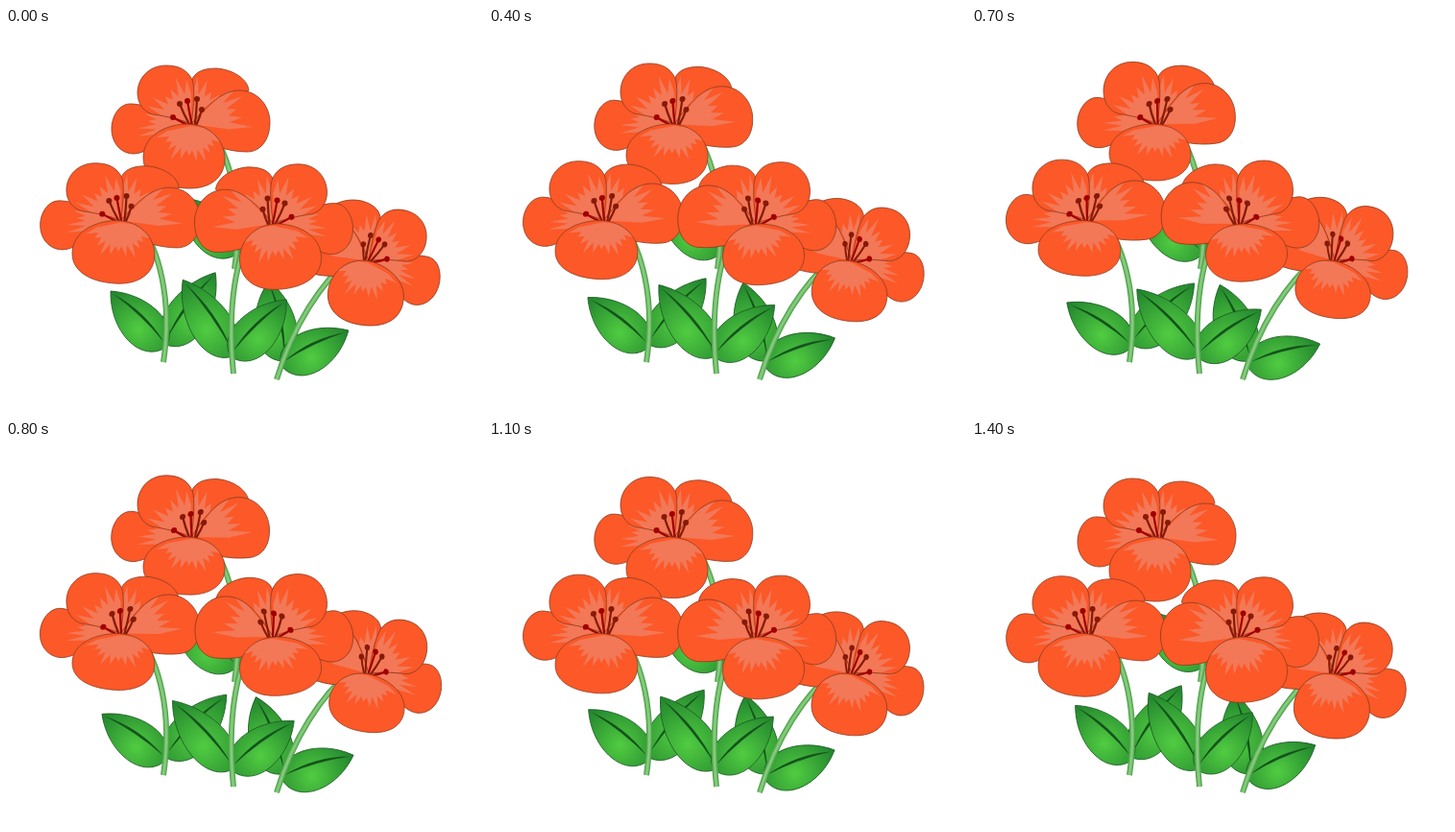
Recreate the animation shown at these times as an HTML page with a canvas. Size 497x401 px, loop 1500 ms.

```html
<!DOCTYPE html>
<html lang="en">
<head>
<meta charset="utf-8">
<title>Swaying flowers</title>
<style>
html, body { margin: 0; width: 100%; height: 100%; overflow: hidden; background: #fff; }
canvas { display: block; }
</style>
</head>
<body>
<canvas width="497" height="401"></canvas>
<script>
const ctx = document.querySelector('canvas').getContext('2d');
const RAD = Math.PI / 180;

// Jagged pale fan spreading from the flower centre, angles in degrees.
function fan(from, to, spikes, radius, y = 0) {
  const path = new Path2D();
  path.moveTo(0, y);
  for (let i = 0; i <= spikes * 2; i++) {
    const angle = (from + (to - from) * i / (spikes * 2)) * RAD;
    const r = radius * (i % 2 ? 0.88 + 0.12 * Math.sin(i * 2.3) : 0.62);
    path.lineTo(Math.cos(angle) * r, y + Math.sin(angle) * r);
  }
  path.closePath();
  return path;
}

// turn: degrees at full sway, stretch: change of height at full sway
const petal = (d, streaks, turn, stretch) => ({ shape: new Path2D(d), streaks, turn, stretch });
const backPetals = [
  petal('M0 0C-10 -4 -40 -20 -62 -21C-75 -22 -83 -8 -83 5C-83 20 -73 31 -60 31C-45 31 -25 12 0 0Z',
    fan(163, 196, 4, 59), 6, 0),
  petal('M0 0C-1 -20 -1 -38 1 -47C5 -55 14 -58 26 -58C43 -57 59 -47 60 -35C52 -30 20 -16 0 0Z',
    fan(272, 320, 4, 51), 0, 0.05),
  petal('M0 0C3 -20 4 -38 1 -46C-4 -57 -14 -61 -26 -61C-44 -61 -56 -48 -56 -32C-56 -20 -48 -12 -40 -10C-25 -8 -8 -4 0 0Z',
    fan(196, 270, 6, 51), 0, 0.06),
  petal('M0 0C12 -14 30 -35 50 -35C70 -35 82 -18 82 -2C82 17 72 29 58 29C48 29 38 27 28 24C20 20 10 8 0 0Z',
    fan(-44, 8, 5, 64), -8.5, 0)
];
const frontPetal = petal('M-5 0C-30 1 -50 14 -50 35C-50 56 -28 66 -4 67C18 68 35 57 35 36C35 18 20 0 -5 0Z',
  fan(8, 168, 12, 41, 2), 0, -0.12);
const anthers = [[-12, -21], [-4, -24], [6, -26], [11, -15], [-19, -7]];

function drawPetal({ shape, streaks, turn, stretch }, sway) {
  ctx.save();
  ctx.rotate(turn * sway * RAD);
  ctx.scale(1, 1 + stretch * sway);
  ctx.fillStyle = '#fc5828';
  ctx.fill(shape);
  ctx.save();
  ctx.clip(shape);
  ctx.fillStyle = '#f27857';
  ctx.fill(streaks);
  ctx.restore();
  ctx.strokeStyle = '#8c3c20';
  ctx.lineWidth = 0.8;
  ctx.stroke(shape);
  ctx.restore();
}

function drawStamens(sway) {
  ctx.save();
  ctx.transform(1, 0, -0.17 * sway, 1, 0, 0);
  ctx.lineWidth = 2.2;
  anthers.forEach(([x, y], i) => {
    ctx.strokeStyle = ctx.fillStyle = i === 4 || i === 1 ? '#a00000' : '#861a08';
    ctx.beginPath();
    ctx.moveTo(x * 0.3 + 2, 1);
    ctx.quadraticCurveTo(x * 0.75 + 1, y * 0.5, x, y);
    ctx.stroke();
    ctx.beginPath();
    ctx.arc(x, y, 3, 0, 7);
    ctx.fill();
  });
  ctx.restore();
}

function drawFlower([x, y, scaleX, scaleY, tilt = 0], sway) {
  ctx.save();
  ctx.translate(x, y);
  ctx.rotate(tilt * RAD);
  ctx.scale(scaleX, scaleY);
  backPetals.forEach(p => drawPetal(p, sway));
  drawStamens(sway);
  drawPetal(frontPetal, sway);
  ctx.restore();
}

// Drawn along the x axis with the upper side at negative y.
function drawLeaf([x, y, angle, length, turn], sway) {
  const at = f => length * f;
  ctx.save();
  ctx.translate(x, y);
  ctx.rotate((angle + turn * sway) * RAD);
  if (angle < -90) ctx.scale(1, -1);
  const green = ctx.createRadialGradient(at(0.4), 7, 1, at(0.4), 7, at(0.62));
  green.addColorStop(0, '#50cb41');
  green.addColorStop(1, '#1f7f2c');
  ctx.beginPath();
  ctx.moveTo(0, 0);
  ctx.bezierCurveTo(at(0.06), -27, at(0.62), -28, at(1), 0);
  ctx.bezierCurveTo(at(0.64), 30, at(0.08), 30, 0, 0);
  ctx.fillStyle = green;
  ctx.fill();
  ctx.strokeStyle = '#1d5c24';
  ctx.lineWidth = 0.8;
  ctx.stroke();
  ctx.beginPath();
  ctx.moveTo(at(0.06), -3);
  ctx.quadraticCurveTo(at(0.5), -11.5, at(0.95), 0);
  ctx.quadraticCurveTo(at(0.5), -6, at(0.06), -3);
  ctx.fillStyle = '#14541c';
  ctx.fill();
  ctx.restore();
}

function drawStem(d) {
  const path = new Path2D(d);
  [['#4ea34a', 6], ['#6dbb66', 4], ['#8acb82', 1.8]].forEach(([color, width]) => {
    ctx.strokeStyle = color;
    ctx.lineWidth = width;
    ctx.stroke(path);
  });
}

// Leaves: base x, base y, angle, length, turn, slow return
const leftLeaves = [[167, 330, -55.8, 91, 11], [166, 333, -134, 82, -11, true]];
const leftStem = 'M140 205C158 230 174 280 164 348';
const plants = [
  { leaves: leftLeaves, stem: leftStem, flower: [193, 100, 1, 1], shift: [74, -97] },
  { leaves: leftLeaves, stem: leftStem, flower: [119.5, 200.5, 1.01, 0.98] },
  {
    leaves: [[288, 347, -99.5, 85, -11], [287, 352, -27.9, 79, 11, true]],
    stem: 'M361 238C328 265 299 310 282 366',
    flower: [378, 242.5, -0.93, 1, 16]
  },
  {
    leaves: [[236, 342, -123, 95, -9.5], [235, 343, -46.4, 83, 9.5]],
    stem: 'M258 210C240 235 230 290 237 360',
    flower: [278.5, 204, -1, 1.02]
  }
];

function draw(now) {
  const step = Math.floor(now % 1500 / 100);
  const swayOver = back => step <= 7 ? step / 7 : (7 + back - step) / back;
  const sway = swayOver(7), slowSway = swayOver(8);
  ctx.fillStyle = '#fff';
  ctx.fillRect(0, 0, 497, 401);
  for (const { leaves, stem, flower, shift = [0, 0] } of plants) {
    ctx.save();
    ctx.translate(...shift);
    leaves.forEach(leaf => drawLeaf(leaf, leaf[5] ? slowSway : sway));
    drawStem(stem);
    ctx.restore();
    drawFlower(flower, sway);
  }
}

const start = performance.now();
function tick() {
  draw(performance.now() - start);
  requestAnimationFrame(tick);
}
tick();
</script>
</body>
</html>
```
